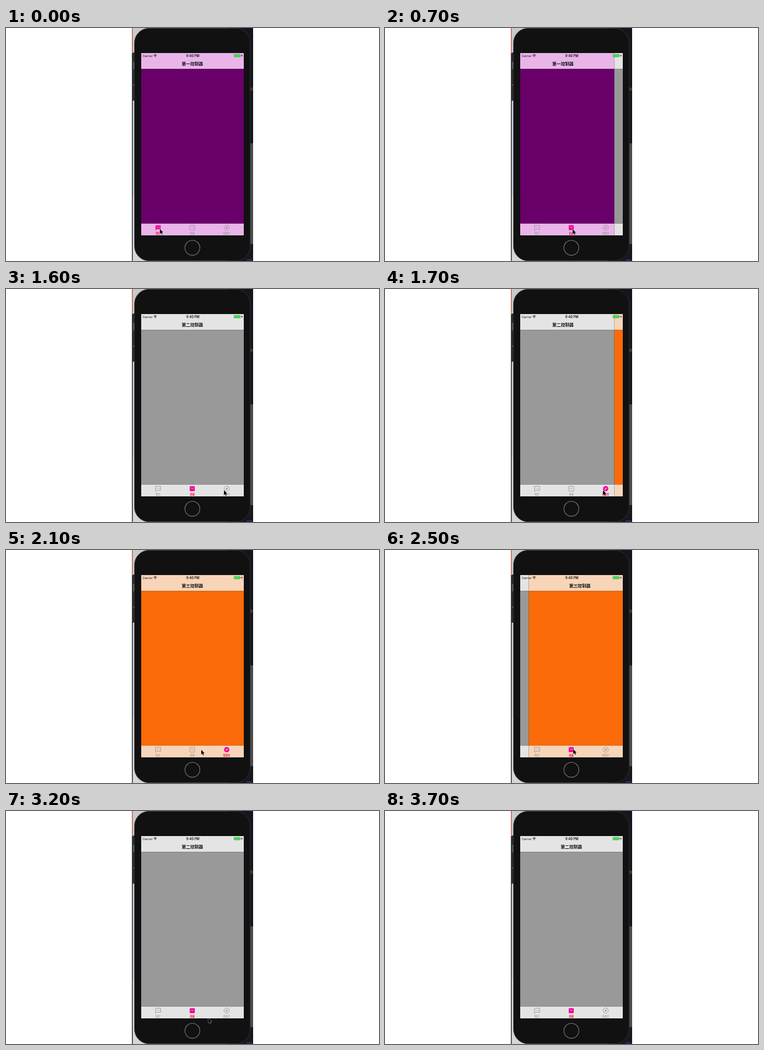
Recreate the animation shown at these times as an HTML page with a canvas. Size 640 px wide and 400 px high, loop 3800 ms.

```html
<!DOCTYPE html>
<html lang="zh">
<head>
<meta charset="utf-8">
<style>
html, body { margin: 0; width: 100%; height: 100%; overflow: hidden; background: #fff; }
canvas { display: block; width: 640px; height: 400px; }
</style>
</head>
<body>
<canvas id="stage"></canvas>
<script>
const LOOP = 3800, STEP = 100;
const SCREEN = { x: 232, y: 43, w: 176, h: 313 };
const SANS = 'Inter, "Noto Sans CJK SC", "Noto Sans CJK", sans-serif';
const CJK = '"Noto Sans CJK SC", "Noto Sans CJK", sans-serif';
const PAGES = [
  { title: '第一控制器', body: '#6a0069', bar: '#e9b5e9' },
  { title: '第二控制器', body: '#999999', bar: '#e4e4e4' },
  { title: '第三控制器', body: '#fb6b09', bar: '#f8d5b9' }
];
const TABS = [
  { x: 261, label: '短信', icon: bubble },
  { x: 319.6, label: '商城', icon: bag },
  { x: 378.7, label: '指南针', icon: compass }
];
// Tab switches: the tab lights up at once, the page slides shortly after
const SWITCHES = [
  { at: 663, from: 0, to: 1 },
  { at: 1663, from: 1, to: 2 },
  { at: 2463, from: 2, to: 1 }
];
const SLIDE = 135;
// Pointer path: time, x, y
const PATH = [
  [0, 264, 345], [200, 264, 345], [600, 322, 345.5], [1000, 322, 345.5],
  [1500, 374, 345.5], [1850, 374, 345.5], [2100, 335, 343], [2300, 323, 342],
  [2900, 323, 342], [3600, 400, 385]
];

const canvas = document.getElementById('stage');
const ctx = canvas.getContext('2d');
const dpr = window.devicePixelRatio || 1;
canvas.width = 640 * dpr;
canvas.height = 400 * dpr;

const ease = p => p < 0.5 ? 4 * p ** 3 : 1 - (2 - 2 * p) ** 3 / 2;
const clamp = p => Math.max(0, Math.min(1, p));

function rect(x, y, w, h, color) {
  ctx.fillStyle = color;
  ctx.fillRect(x, y, w, h);
}

function roundRect(x, y, w, h, r) {
  ctx.beginPath();
  ctx.roundRect(x, y, w, h, r);
}

function circle(x, y, r) {
  ctx.beginPath();
  ctx.arc(x, y, r, 0, Math.PI * 2);
}

function poly(points, closed) {
  ctx.beginPath();
  points.forEach(([x, y]) => ctx.lineTo(x, y));
  if (closed) ctx.closePath();
}

function text(str, x, y, font, color, align = 'center') {
  ctx.font = font;
  ctx.fillStyle = color;
  ctx.textAlign = align;
  ctx.fillText(str, x, y);
}

function drawDesktop() {
  rect(216, 0, 166, 60, '#c9c9cb');
  rect(216, 0, 1.3, 43, '#b8593c');
  rect(216, 43, 8, 82, '#54565a');
  rect(216, 125, 8, 164, '#c4ccd4');
  rect(216, 289, 30, 111, '#d6d6d6');
  rect(216, 43, 1.4, 357, '#25272c');
  rect(382, 0, 42, 198, '#14161f');
  rect(410, 198, 14, 173, '#4b4c50');
  rect(382, 371, 42, 29, '#17171f');
  rect(413, 397, 9, 2, '#55205c');
  ctx.strokeStyle = '#a8622c';
  ctx.lineWidth = 1;
  circle(420.8, 105, 2);
  ctx.stroke();
}

function drawPhone() {
  [[42, 16], [71, 26], [99, 25]].forEach(([y, h]) => rect(218.3, y, 3, h, '#1c1c1d'));
  roundRect(220.5, 0.4, 198.5, 399.2, 25);
  ctx.fillStyle = '#111112';
  ctx.fill();
  ctx.strokeStyle = '#343436';
  ctx.lineWidth = 0.9;
  ctx.stroke();
  circle(319.8, 377.3, 12.8);
  ctx.strokeStyle = '#777779';
  ctx.lineWidth = 1.1;
  ctx.stroke();
}

function drawPage(page, dx) {
  const { x, y, w, h } = SCREEN;
  rect(x + dx, y, w, 27.3, page.bar);
  rect(x + dx, y + 27.3, w, 265.5, page.body);
  rect(x + dx, y + 292.8, w, h - 292.8, page.bar);
  text(page.title, 319.8 + dx, 64, 'bold 7.35px ' + CJK, '#111');
}

function drawStatus() {
  text('Carrier', 234.2, 49.6, '5.3px ' + SANS, '#111', 'left');
  text('9:40 PM', 320.5, 49.7, '600 5.5px ' + SANS, '#111');
  ctx.strokeStyle = '#111';
  ctx.lineWidth = 1;
  [1.9, 3.7].forEach(r => {
    ctx.beginPath();
    ctx.arc(256, 49.4, r, -Math.PI * 0.76, -Math.PI * 0.24);
    ctx.stroke();
  });
  circle(256, 49.2, 0.7);
  ctx.fillStyle = '#111';
  ctx.fill();
  roundRect(391, 45, 10.8, 4.9, 1);
  ctx.fillStyle = '#43d85a';
  ctx.fill();
  ctx.strokeStyle = '#67946b';
  ctx.lineWidth = 0.4;
  ctx.stroke();
  rect(402.2, 46.6, 0.6, 1.7, '#555');
  poly([[405.3, 44.9], [403.5, 47.8], [404.7, 47.8], [404.2, 50], [406.1, 47], [404.9, 47]], true);
  ctx.fillStyle = '#111';
  ctx.fill();
}

function paintIcon(on) {
  if (on) ctx.fill();
  else ctx.stroke();
}

function bubble(on, mark) {
  poly([[-4.4, -4], [4.4, -4], [4.4, 2.9], [-1.8, 2.9], [-4.4, 4.6]], true);
  paintIcon(on);
  ctx.fillStyle = mark;
  [-1.7, 0.5, 2.7].forEach(x => ctx.fillRect(x - 0.5, -0.9, 1, 1));
}

function bag(on, mark) {
  roundRect(-4.3, -4.3, 8.6, 8.6, 1);
  paintIcon(on);
  ctx.strokeStyle = mark;
  poly([[-2.2, -1.9], [-1, -0.1], [0, 0.4], [1, -0.1], [2.2, -1.9]]);
  ctx.stroke();
}

function compass(on, mark) {
  circle(0, 0, 4.5);
  paintIcon(on);
  ctx.fillStyle = mark;
  poly([[2.2, -2.2], [0.8, 0.8], [-2.2, 2.2], [-0.8, -0.8]], true);
  ctx.fill();
}

function drawTabs(active) {
  TABS.forEach((tab, i) => {
    const on = i === active;
    ctx.save();
    ctx.translate(tab.x, 342.7);
    const fill = ctx.createLinearGradient(0, -4.5, 0, 4.5);
    fill.addColorStop(0, '#e600c0');
    fill.addColorStop(1, '#fa0868');
    ctx.fillStyle = fill;
    ctx.strokeStyle = '#8f8b8f';
    ctx.lineWidth = 0.75;
    tab.icon(on, on ? '#f7c6ec' : '#8f8b8f');
    ctx.restore();
    text(tab.label, tab.x, 353.6, (on ? 'bold ' : '') + '4.2px ' + CJK, on ? '#f0144e' : '#8f8b8f');
  });
}

function drawPointer(t) {
  if (t >= 3700) return;
  const i = Math.max(1, PATH.findIndex(p => p[0] >= t));
  const end = t > PATH[PATH.length - 1][0] ? PATH.length - 1 : i;
  const [t0, x0, y0] = PATH[end - 1], [t1, x1, y1] = PATH[end];
  const p = ease(clamp((t - t0) / (t1 - t0)));
  ctx.save();
  ctx.translate(x0 + (x1 - x0) * p, y0 + (y1 - y0) * p);
  poly([[0, 0], [0, 8.3], [1.9, 6.6], [3.2, 9.5], [4.6, 8.9], [3.3, 6.1], [5.8, 5.9]], true);
  ctx.strokeStyle = '#eee';
  ctx.lineWidth = 0.8;
  ctx.stroke();
  ctx.fillStyle = '#050505';
  ctx.fill();
  ctx.restore();
}

function draw(t) {
  ctx.setTransform(dpr, 0, 0, dpr, 0, 0);
  rect(0, 0, 640, 400, '#fff');
  ctx.save();
  ctx.beginPath();
  ctx.rect(216, 0, 208, 400);
  ctx.clip();
  drawDesktop();
  drawPhone();

  ctx.save();
  ctx.beginPath();
  ctx.rect(SCREEN.x, SCREEN.y, SCREEN.w, SCREEN.h);
  ctx.clip();
  const last = SWITCHES.filter(s => s.at <= t).pop() || { at: 0, from: 0, to: 0 };
  const p = ease(clamp((t - last.at) / SLIDE));
  const dir = Math.sign(last.to - last.from);
  if (dir && p < 1) drawPage(PAGES[last.from], -dir * p * SCREEN.w);
  drawPage(PAGES[last.to], dir * (1 - p) * SCREEN.w);
  drawStatus();
  drawTabs(last.to);
  ctx.restore();

  drawPointer(t);
  ctx.restore();
}

const start = performance.now();
function tick() {
  const t = (performance.now() - start) % LOOP;
  draw(Math.floor(t / STEP) * STEP);
  requestAnimationFrame(tick);
}
tick();
</script>
</body>
</html>
```
